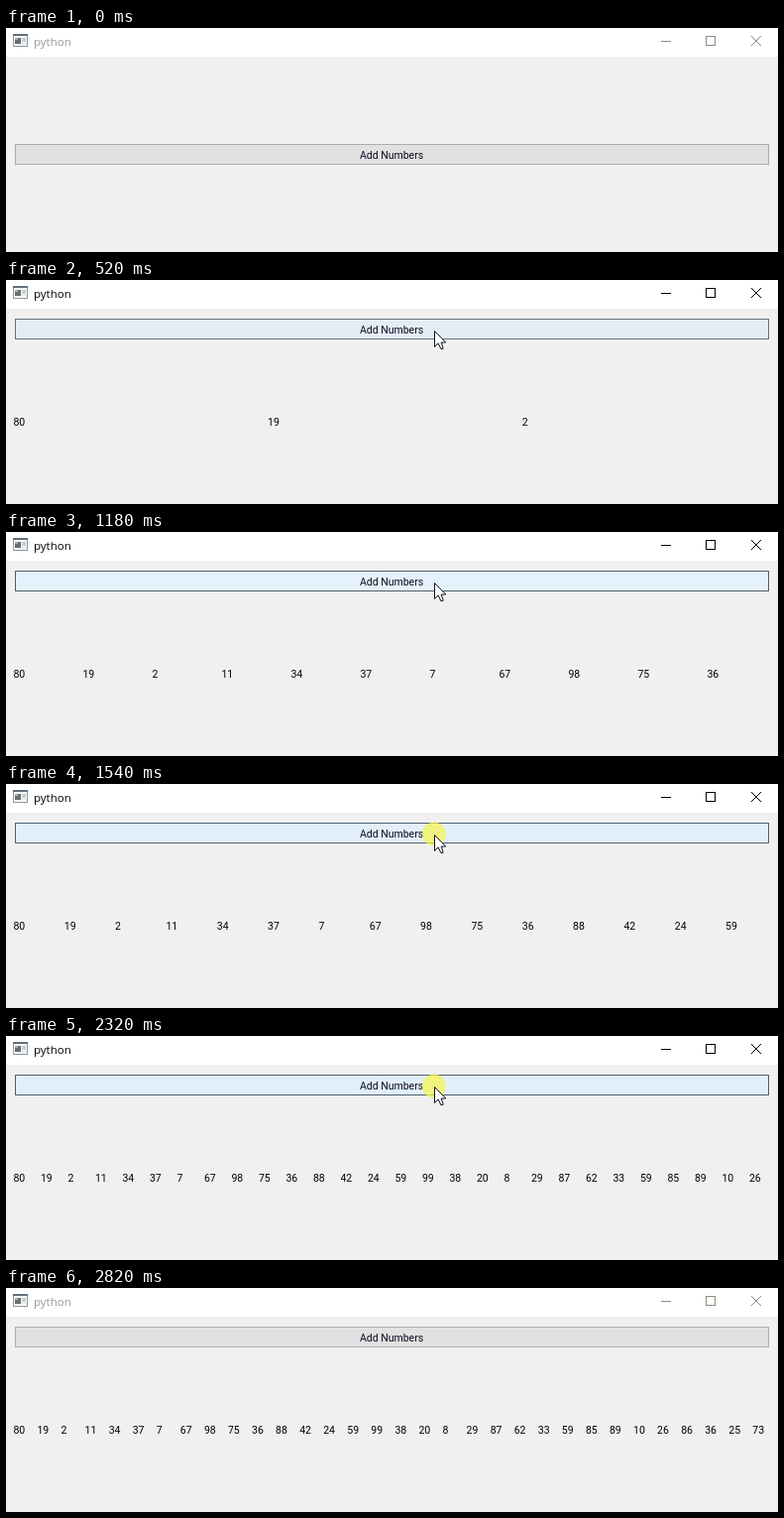
An HTML page with a canvas that plays this animation: 779x226 px, repeating every 2870 ms.

```html
<!DOCTYPE html>
<html lang="en">
<head>
<meta charset="utf-8">
<title>Add Numbers</title>
<style>
  html, body { margin: 0; width: 100%; height: 100%; overflow: hidden; background: #f0f0f0; }
  canvas { display: block; }
</style>
</head>
<body>
<canvas id="stage" width="779" height="226"></canvas>
<script>
const ctx = document.getElementById('stage').getContext('2d');
const LOOP = 2870;
const NUMBERS = [80, 19, 2, 11, 34, 37, 7, 67, 98, 75, 36, 88, 42, 24, 59, 99,
  38, 20, 8, 29, 87, 62, 33, 59, 85, 89, 10, 26, 86, 36, 25, 73];

// Each click adds a batch of numbers when the mouse button is released.
const CLICKS = [
  { press: 180, total: 3 }, { press: 545, total: 6 }, { press: 890, total: 11 },
  { press: 1210, total: 15 }, { press: 1520, total: 20 }, { press: 1918, total: 28 },
  { press: 2296, total: 32 }
];
const HOLD = 100, FADE = 150;

const CURSOR = [[130, 520, 200], [175, 495, 128], [350, 495, 128], [520, 432, 51],
  [2430, 432, 51], [2720, 452, 226]];
const HOVER = [[150, 0], [185, 1], [320, 1], [440, 0], [480, 0], [540, 1], [2470, 1], [2680, 0]];

const GREY = [225, 225, 225], LIGHT = [229, 241, 251], PRESSED = [204, 228, 247];
const BORDER = [173, 173, 173], BORDER_HOT = [78, 96, 110];

const clamp = v => Math.max(0, Math.min(1, v));
const smooth = v => v * v * (3 - 2 * v);
const mix = (a, b, k) => a.map((v, i) => v + (b[i] - v) * k);
const css = c => `rgb(${c.map(Math.round).join()})`;

function track(keys, t) {
  if (t <= keys[0][0]) return keys[0].slice(1);
  for (let i = 1; i < keys.length; i++) {
    const [from, ...a] = keys[i - 1], [to, ...b] = keys[i];
    if (t <= to) return mix(a, b, smooth((t - from) / (to - from)));
  }
  return keys[keys.length - 1].slice(1);
}

function pressAmount(t) {
  return Math.max(...CLICKS.map(({ press }) => {
    const age = t - press;
    return age < 0 ? 0 : clamp((Math.min(age, HOLD) - Math.max(age - HOLD, 0)) / FADE);
  }));
}

function rect(x, y, w, h, color) {
  ctx.fillStyle = color;
  ctx.fillRect(x, y, w, h);
}

function line(color, ...points) {
  ctx.strokeStyle = color;
  ctx.beginPath();
  points.forEach(([x, y], i) => i ? ctx.lineTo(x, y) : ctx.moveTo(x, y));
  ctx.stroke();
}

function text(string, x, y, font, color, align = 'left') {
  ctx.font = font;
  ctx.fillStyle = color;
  ctx.textAlign = align;
  ctx.fillText(string, x, y);
}

function drawTitleBar(active) {
  const color = active ? '#000' : '#8d8c80';
  rect(0, 0, 779, 29, '#fff');

  // window icon
  rect(7, 6, 15, 13, '#8e9aa3');
  rect(8, 8, 13, 10, '#f4f6f7');
  rect(7, 6, 15, 2, '#60707c');
  rect(9, 10, 6, 6, '#68716d');
  rect(9, 10, 3, 2, '#a3adad');
  rect(16, 10, 4, 4, '#c5ced3');
  rect(16, 15, 4, 1, '#dce1e4');

  text('python', 28, 18, '11.5px "Open Sans", sans-serif', active ? '#000' : '#999');
  rect(661, 13, 10, 1, color);
  ctx.strokeStyle = color;
  ctx.strokeRect(706.5, 8.5, 9, 9);
  line(color, [752, 8], [762, 18]);
  line(color, [762, 8], [752, 18]);
}

function drawButton(y, t) {
  const [hover] = track(HOVER, t);
  rect(9, y, 761, 21, css(mix(mix(GREY, LIGHT, hover), PRESSED, pressAmount(t))));
  ctx.strokeStyle = css(mix(BORDER, BORDER_HOT, hover));
  ctx.strokeRect(9.5, y + .5, 760, 20);
  text('Add Numbers', 389, y + 15, '10.5px Roboto, sans-serif', '#0a0a20', 'center');
}

function drawNumbers(count) {
  for (let i = 0; i < count; i++)
    text(NUMBERS[i], 7.4 + i * 770 / count, 147, '10.5px Roboto, sans-serif', '#000');
}

function drawCursor(t) {
  if (t < 130 || t >= 2720) return;
  const [x, y] = track(CURSOR, t);
  if (CLICKS.some(c => t >= c.press && t < c.press + HOLD)) {
    ctx.fillStyle = 'rgba(247,247,70,.7)';
    ctx.beginPath();
    ctx.arc(x, y - .5, 12, 0, 2 * Math.PI);
    ctx.fill();
  }
  ctx.save();
  ctx.translate(Math.round(x) + .5, Math.round(y) + .5);
  const arrow = new Path2D('M0 0V16L3.7 12.4L6.3 18H8.4V16.5L6.6 11.5H11.2Z');
  ctx.fillStyle = '#fff';
  ctx.fill(arrow);
  ctx.strokeStyle = '#10101c';
  ctx.stroke(arrow);
  ctx.restore();
}

function draw(t) {
  const count = CLICKS.reduce((n, c) => t >= c.press + HOLD ? c.total : n, 0);
  rect(0, 0, 779, 226, '#f0f0f0');
  drawTitleBar(t >= CLICKS[0].press && t < 2820);
  drawButton(count ? 39 : 117, t);
  drawNumbers(count);
  drawCursor(t);
}

function tick() {
  draw(performance.now() % LOOP);
  requestAnimationFrame(tick);
}
tick();
</script>
</body>
</html>
```
